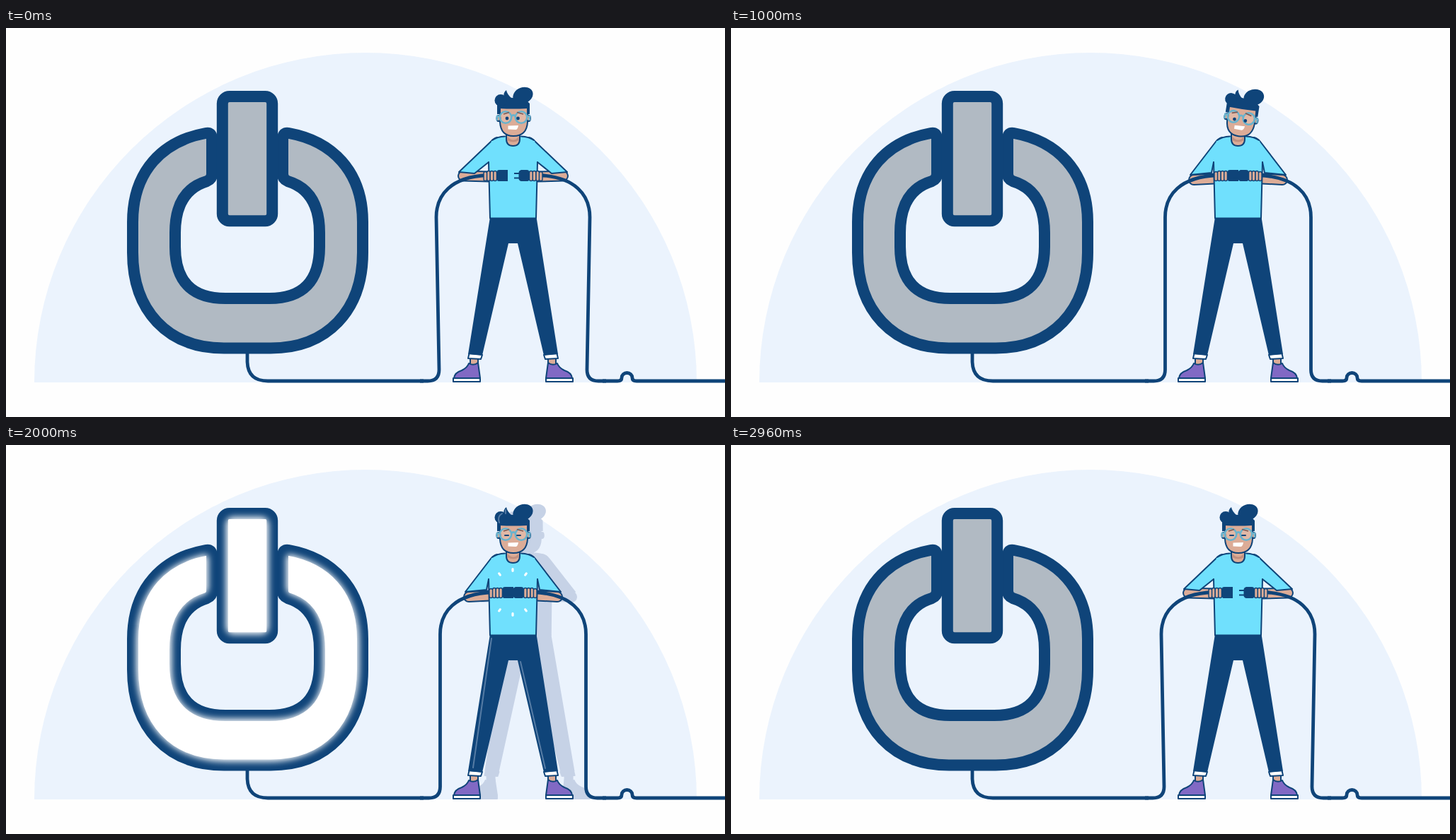
Recreate the animation shown at these times as an HTML page. Size 1016 by 551 pixels, loop 3 s.

```html
<!DOCTYPE html>
<html lang="en">
<head>
<meta charset="utf-8">
<title>Power plug</title>
<style>
  html, body { margin: 0; width: 100%; height: 100%; overflow: hidden; background: #fefefe; }
  svg { display: block; width: 100%; height: 100%; }
  .navy { fill: #0f4479; }
  .line { fill: none; stroke: #0f4479; stroke-width: 2; stroke-linecap: round; stroke-linejoin: round; }
  .edge { stroke: #0f4479; stroke-width: 2; stroke-linejoin: round; }
  .wire { fill: none; stroke: #0f4479; stroke-width: 4.8; stroke-linejoin: round; }
  .pins { fill: none; stroke: #0f4479; stroke-width: 2.2; }
  .skin { fill: #dcac97; }
  .shirt { fill: #70e0fd; }
  .shoe { fill: #8169c4; }
  .white { fill: #fff; }
  .sign { stroke: #0f4479; stroke-width: 16; stroke-linejoin: round; }
  .rim { fill: none; stroke: #557ba4; stroke-width: 2; stroke-linecap: round; }
  .glasses { fill: none; stroke: #69b3cd; stroke-width: 2.6; }
</style>
</head>
<body>
<svg viewBox="0 0 1016 551">
  <defs>
    <path id="ring" d="M282 149Q291 147 291 157V207Q291 214 284 217C254 226 239 250 239 290V310C239 358 262 383 310 383H372C420 383 443 358 443 310V290C443 250 428 226 398 217Q391 214 391 207V157Q391 147 400 149C460 160 504 202 504 275V318C504 400 454 453.500 374 453.500H308C228 453.500 179 400 179 318V275C179 202 222 160 282 149Z"/>
    <rect id="bar" x="305.800" y="97" width="70.400" height="176.300" rx="10"/>
    <filter id="glow" x="-10%" y="-10%" width="120%" height="120%">
      <feMorphology operator="erode" radius="5"/><feGaussianBlur stdDeviation="5"/>
    </filter>
    <filter id="cast" x="-15%" y="-5%" width="145%" height="110%">
      <feFlood flood-color="#c6d2e6"/>
      <feComposite in2="SourceAlpha" operator="in"/>
      <feOffset dx="17" dy="0"/>
    </filter>
  </defs>

  <path fill="#ebf3fd" d="M40 502A468 467 0 0 1 976 502Z"/>

  <g id="sign">
    <use href="#ring" class="sign"/>
    <g class="lit white" filter="url(#glow)"><use href="#ring"/></g>
    <use href="#bar" class="sign"/>
    <g class="lit white" filter="url(#glow)"><use href="#bar"/></g>
  </g>

  <g class="lit" filter="url(#cast)"><use href="#man" transform="skewX(.8)"/></g>

  <g id="man">
    <g id="leg">
      <path class="skin edge" d="M656 466V478H667V466Z"/>
      <path class="shoe edge" d="M633 496Q634 488 644 485Q652 481 654 475Q661 479 667 474L670 496Z"/>
      <path class="white edge" d="M632 496H670V501H632Z"/>
      <path class="white edge" d="M654.500 461L673 463L671 469L653 468Z"/>
    </g>
    <use href="#leg" transform="translate(1433) scale(-1 1)"/>
    <path class="navy" d="M684 268H749.500L780 462L760 463.500L723 305H710L673 463.500L653 462Z"/>
    <path class="rim lit" d="M686 274L660 457M727 307L762 458"/>

    <g id="arm">
      <path id="forearm" fill="none" stroke="#0f4479" stroke-width="16" stroke-linecap="round"/>
      <path id="forearmSkin" fill="none" stroke="#dcac97" stroke-width="12" stroke-linecap="round"/>
      <path id="sleeve" class="shirt edge"/>
    </g>
    <use href="#arm" transform="translate(1433) scale(-1 1)"/>

    <path class="shirt" d="M704 154Q692 154 686 160L682 194L684 269.500H749L751 194L747 160Q741 154 729 154Z"/>
    <path class="line" d="M687 159Q694 154 705 153.500M746 159Q739 154 728 153.500M682 190L684 269.500H749L751 190"/>
    <path class="skin edge" d="M707 146V157Q707 167 716.500 167Q726 167 726 157V146Z"/>
    <path d="M708.500 154Q717 163 724.500 154V159Q717 164 708.500 159Z" fill="#c18f7f"/>

    <g id="head">
      <path class="skin edge" d="M698 110H737V133Q736 153 717 153Q699 153 698 133Z"/>
      <ellipse class="skin edge" cx="696" cy="128" rx="2.500" ry="4"/>
      <ellipse class="skin edge" cx="738.500" cy="128" rx="2.500" ry="4"/>
      <g class="navy">
        <path d="M694 107Q705 97 717 99Q733 99 740 107V122H737L736 114Q716 115 698 114L697 122H694Z"/>
        <circle cx="699" cy="102.500" r="8.500"/>
        <path d="M704 100Q702 91 707 88Q708 94 715 100Z"/>
        <ellipse cx="730.500" cy="95.500" rx="14.500" ry="11.300" transform="rotate(-22 730.500 95.500)"/>
      </g>
      <path class="rim lit" d="M697 110Q694 101 701 97M706 97L706 92"/>
      <g class="glasses">
        <circle cx="706" cy="126.500" r="8.200" fill="#fff" fill-opacity=".15"/>
        <circle cx="728" cy="126.500" r="8.200" fill="#fff" fill-opacity=".15"/>
        <path d="M714 125Q717 122 720 125M698 125H694V131M736 125H740V131"/>
      </g>
      <path fill="none" stroke="#7d5a55" stroke-width="1.800" d="M703 122L711 119.500M722 119.500L731 122"/>
      <g id="eyesOpen" class="navy"><circle cx="708" cy="128" r="2.400"/><circle cx="723.500" cy="128" r="2.400"/></g>
      <path id="eyesShut" class="line" d="M705 128H710M722 128H727"/>
      <path class="white" d="M709.500 138.500L724 138Q723 144 720 144L709.500 143.500Z"/>
    </g>
  </g>

  <g id="sparks" stroke="#fff" stroke-width="3.200" stroke-linecap="round"></g>

  <path class="wire" d="M341 460V473Q342 500 370 500H590M843 500H864Q870 500 870 495.500A7.500 7 0 0 1 885 495.500Q885 500 891 500H1016"/>
  <path id="cable" class="wire"/>
  <use href="#cable" transform="translate(1433) scale(-1 1)"/>

  <g id="leftHand">
    <path class="navy" d="M688 205L702 203Q702 201 705 201H717V217H705Q702 217 702 215L688 213Z"/>
    <g id="fingers"></g>
  </g>
  <g id="rightHand">
    <path class="navy" d="M745 205L731 203Q731 201 728 201H720Q716.500 202 716.500 205V213Q716.500 216 720 217H728Q731 217 731 215L745 213Z"/>
    <path class="pins" d="M710 206H719M710 212.500H719"/>
    <use href="#fingers" transform="translate(1433) scale(-1 1)"/>
  </g>
</svg>
<script>
const LOOP = 3000;
const $ = id => document.getElementById(id);
const set = (id, name, value) => $(id).setAttribute(name, value);
const show = (node, on) => { node.style.display = on ? '' : 'none'; };
const within = (t, from, to) => t >= from && t < to;
const mix = (a, b, k) => a + (b - a) * k;
const ease = k => k * k * (3 - 2 * k);

// Keys are [time, value] pairs in order of time.
function track(keys, t) {
  const next = keys.findIndex(key => key[0] > t);
  if (next < 0) return keys[keys.length - 1][1];
  if (next === 0) return keys[0][1];
  const [t0, a] = keys[next - 1], [t1, b] = keys[next];
  return mix(a, b, ease((t - t0) / (t1 - t0)));
}

const gapKeys = [[0, 8], [80, 8], [330, 0], [1110, 0], [1360, 22], [1480, 22], [1730, 0], [2300, 0], [2600, 8]];
const tiltKeys = [[100, 0], [340, 8.5], [1120, 8.5], [1340, 0]];

// Sleeve cuff outer and inner, armpit, elbow, wrist, cable top and bottom, for each gap.
const poses = [
  [0, [649, 208, 679, 205, 682, 190, 654, 215, 692, 213, 613.5, 613.5]],
  [8, [640, 204, 662, 206, 682, 190, 646, 209.5, 682, 210.5, 608, 612]],
  [22, [632, 187, 641, 200, 681, 185, 637, 194, 668, 208, 600, 610]]
];

function poseAt(gap) {
  const [low, high] = gap < 8 ? [poses[0], poses[1]] : [poses[1], poses[2]];
  const k = (gap - low[0]) / (high[0] - low[0]);
  return low[1].map((v, i) => mix(v, high[1][i], k));
}

$('fingers').innerHTML = [0, 1, 2, 3].map(i =>
  `<rect class="skin edge" style="stroke-width:1.4" x="${683 + i * 4.6}" y="${202.5 + (i === 0)}" width="4.6" height="${14 - (i === 0)}" rx="2.2"/>`).join('');

const rays = [-126, -90, -54, 54, 90, 126].map(deg => deg * Math.PI / 180);

function drawSparks(age) {
  show($('sparks'), within(age, 0, 480));
  const k = Math.max(0, Math.min(1, age / 450));
  const outer = mix(10, 36, 1 - (1 - k) ** 2);
  const inner = Math.max(9, outer - 9 * Math.max(0, 1 - k * 1.1));
  $('sparks').innerHTML = rays.map(a => {
    const point = r => `${716 + r * Math.cos(a)} ${208.5 + r * Math.sin(a)}`;
    return `<path d="M${point(inner)}L${point(outer + .1)}"/>`;
  }).join('');
}

function draw(t) {
  const gap = track(gapKeys, t);
  const [ox, oy, ix, iy, px, py, ex, ey, wx, wy, top, bottom] = poseAt(gap);
  const lit = within(t, 340, 660) || within(t, 1880, 2080);
  const shut = lit || t >= 2880;
  const tilt = track(tiltKeys, t);

  const forearm = `M${ex} ${ey}L${wx} ${wy}`;
  set('forearm', 'd', forearm);
  set('forearmSkin', 'd', forearm);
  set('sleeve', 'd', `M700 160L694 155Q689 156 685 161L${ox} ${oy}L${ix} ${iy}L${px} ${py}L700 192Z`);
  set('cable', 'd', `M585 500H${bottom - 16}Q${bottom} 500 ${bottom} 484L${top} 268C${top} 236 ${top + 21} 211 ${688 - gap} 208.5`);
  set('leftHand', 'transform', `translate(${-gap})`);
  set('rightHand', 'transform', `translate(${gap})`);
  set('head', 'transform', `rotate(${tilt} 716 153)`);
  set('eyesOpen', 'transform', `translate(0 ${tilt / 4})`);
  set('sign', 'fill', lit ? '#fff' : '#b1bac3');
  document.querySelectorAll('.lit').forEach(node => show(node, lit));
  show($('eyesOpen'), !shut);
  show($('eyesShut'), shut);
  drawSparks(t < 1500 ? t - 310 : t - 1710);
}

const start = performance.now();
function tick() {
  draw((performance.now() - start) % LOOP);
  requestAnimationFrame(tick);
}
tick();
</script>
</body>
</html>
```
